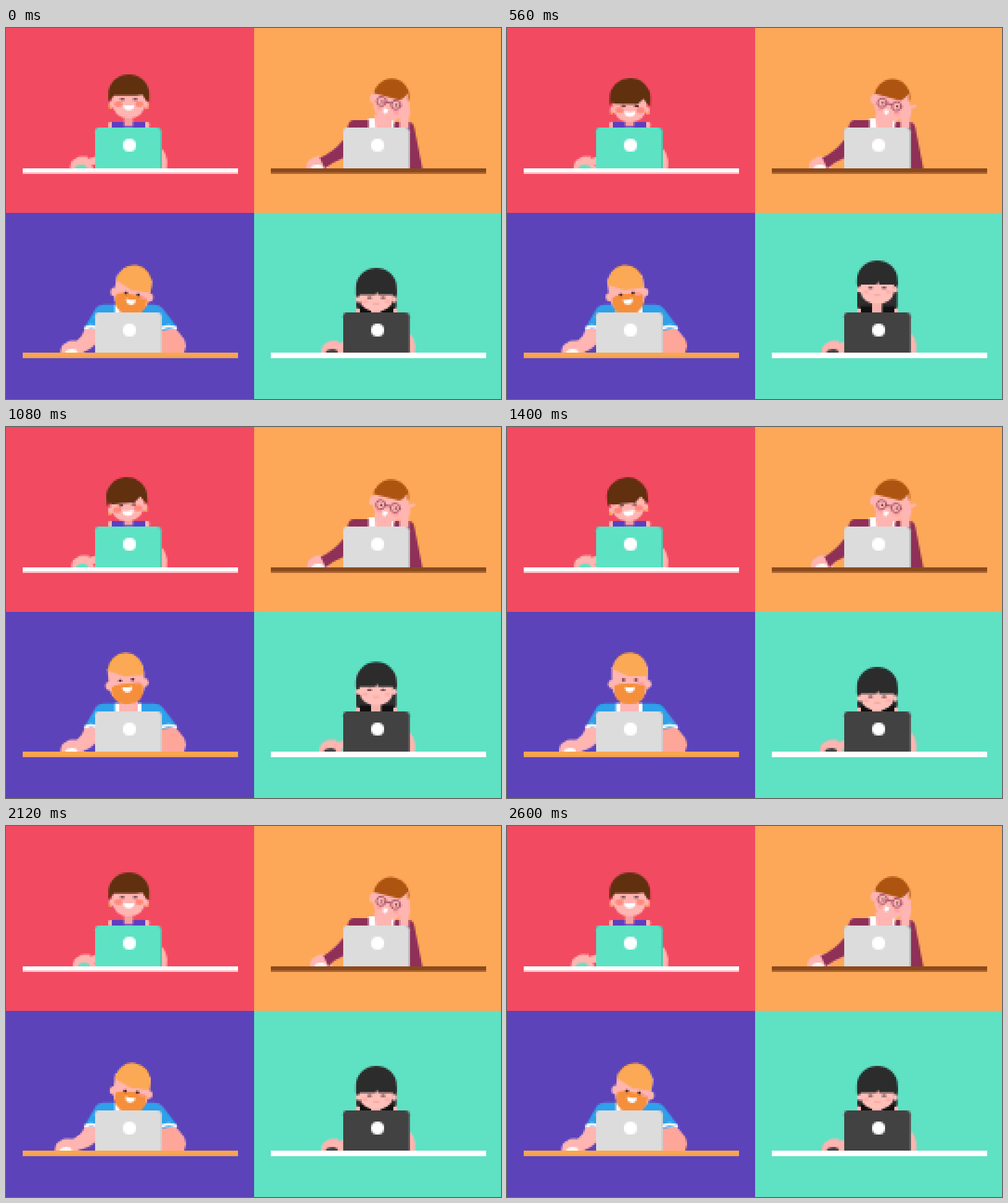
An HTML page with a canvas for the animation above (2640 ms loop, 800x600 px).

```html
<!DOCTYPE html>
<html>
<head>
<meta charset="utf-8">
<style>
html, body { margin: 0; width: 100%; height: 100%; overflow: hidden; }
canvas { display: block; width: 800px; height: 600px; image-rendering: pixelated; }
</style>
</head>
<body>
<canvas id="stage" width="267" height="201"></canvas>
<script>
// Three drawing units make one coarse pixel
const c = document.getElementById('stage').getContext('2d');
const LOOP = 2640, STEP = 40;
const SKIN = '#ffb5b1', DARK = '#4a2430';

function ease(u) {
  u = Math.min(1, Math.max(0, u));
  return u * u * (3 - 2 * u);
}
// Rises from 0 to 1 after `from` and sinks back after `to`
const hold = (t, from, to, ramp = 240) => ease((t - from) / ramp) - ease((t - to) / ramp);

function shape(d, color) {
  c.fillStyle = color;
  c.fill(new Path2D(d));
}
function rect(x, y, w, h, color, r = 0) {
  c.fillStyle = color;
  c.beginPath();
  c.roundRect(x, y, w, h, r);
  c.fill();
}
function oval(x, y, rx, ry, color) {
  c.fillStyle = color;
  c.beginPath();
  c.ellipse(x, y, rx, ry, 0, 0, 7);
  c.fill();
}
function limb(d, width, color, cap = 'round') {
  c.strokeStyle = color;
  c.lineWidth = width;
  c.lineCap = cap;
  c.stroke(new Path2D(d));
}
function pair(gap, y, rx, ry, color) {
  oval(-gap, y, rx, ry, color);
  oval(gap, y, rx, ry, color);
}
function smile(x, y, w) {
  shape(`M${x - w} ${y - 4}Q${x} ${y - 2} ${x + w} ${y - 4}Q${x + w} ${y + 5} ${x} ${y + 5}Q${x - w} ${y + 5} ${x - w} ${y - 4}`, '#fff');
}

// Head space: x = 0 at the chin, y = 0 at the crown; tilts about the chin
function head(x, crown, height, tilt, draw) {
  c.save();
  c.translate(x, crown + height);
  c.rotate(tilt * Math.PI / 180);
  c.translate(0, -height);
  draw();
  c.restore();
}

function hand(x, mouse, lift = 0) {
  shape(`M${x} 228Q${x} 215 ${x + 9} 212Q${x + 13} 208 ${x + 25} 209L${x + 38} 228Z`, SKIN);
  limb(`M${x + 23} 216L${x + 26} ${211 - lift * 4}`, 5, SKIN);
  shape(`M${x + 7} 228Q${x + 9} 222 ${x + 19} 222Q${x + 27} 222 ${x + 28} 228Z`, mouse);
}
const rightArm = () => shape('M250 194Q256 198 258 206Q262 214 260 228H250Z', SKIN);

function girl(t) {
  const nod = hold(t, 60, 1830);
  const tilt = 2.5 * (hold(t, 80, 400) + hold(t, 1500, 1880)) - 6 * hold(t, 900, 1480);
  const hx = 106 - 2.5 * Math.cos(6 * Math.PI * t / LOOP);
  rect(165, 153, 67, 10, SKIN, 4);
  rect(171, 153, 54, 10, '#5c3fc0');
  rect(191, 138, 14, 22, '#f5a09f');
  rightArm();
  limb(`M${hx + 28} 219L148 214`, 12, SKIN);
  hand(hx, '#5ee2c4');
  head(198.5, 75 + 6 * nod, 72, tilt, () => {
    pair(28, 50 + 3 * nod, 4, 6, SKIN);
    pair(30, 54 + 3 * nod, 2, 3, '#f9a64f');
    shape('M-27 26H27V46Q25 72 0 72Q-25 72 -27 46Z', SKIN);
    pair(17, 49 + 4 * nod, 7, 5, '#ff8a7c');
    pair(10.5, 41 + 5 * nod, 4, 1.6, DARK);
    smile(0, 54 + 5 * nod, 9);
    const f = 35 + 8 * nod;
    shape(`M-33 45V32A33 32 0 0 1 33 32V46L27 42L22 34L12 ${f}H-24L-29 41Z`, '#60300f');
  });
}

function clerk(t) {
  const nod = hold(t, 400, 1900, 400), open = hold(t, 100, 1850, 200);
  const hx = 84 + 3 * hold(t, 100, 500) + 6 * hold(t, 1000, 2300);
  const coat = '#8f3058';
  hand(hx, '#fff');
  shape(`M145 181V211Q130 217 ${hx + 30} 228L${hx + 22} 211Q128 203 145 181Z`, coat);
  shape('M144 184L153 155Q155 150 160 150H186V170H144Z', coat);
  shape('M222 160L228 153H250Q257 153 259 163L272 228H240Z', coat);
  rect(185, 147, 41, 18, '#fff');
  shape('M194 140H222V162H196Z', SKIN);
  head(212, 75 + 3 * nod, 74, 14 - nod, () => {
    oval(-27, 45 + 2 * nod, 6, 8, SKIN);
    shape('M-26 25H27V48Q25 75 2 75Q-23 74 -26 47Z', SKIN);
    pair(14, 59 + 2 * nod, 5, 3, '#ffa29e');
    c.strokeStyle = '#96405a';
    c.lineWidth = 2;
    const eye = 47 + 4 * nod;
    for (const x of [-13, 11]) {
      c.beginPath();
      c.arc(x, eye, 7.5, 0, 7);
      c.stroke();
      oval(x + 1, eye, 2, 1.6, DARK);
    }
    limb(`M-5 ${eye - 1}H3M19 ${eye - 1}H24`, 2, '#96405a');
    smile(-3, 60 + 3 * nod, 4);
    shape('M-28 37V29A29 29 0 0 1 29 29V39L25 24Q22 33 15 38Z', '#ad5510');
  });
  shape('M235 163V148L239 124Q247 112 250 122L253 137L250 148V163Z', SKIN);
  limb(`M247 132L${249 + open * 9} ${122 + open * 5}`, 5, SKIN);
}

function beard(t) {
  const up = hold(t, 700, 1420, 380), look = 5.5 * (1 - up);
  const tilt = 9 - 9 * hold(t, 0, 1800, 480) - 8 * hold(t, 0, 900, 480);
  const hx = 88 - 4 * hold(t, 1100, 1450) - 9 * hold(t, 1880, 2350);
  shape(`M128 186L146 190V212Q139 222 ${hx + 34} 228L${hx + 22} 213Q123 204 128 186Z`, SKIN);
  shape('M251 188H274Q291 205 291 217L288 228H251Z', '#ffa69b');
  shape('M127 187L146 154Q149 149 158 149H238Q249 149 253 155L277 187L252 191V170H146V187Z', '#2fa0ea');
  limb('M129 187Q137 183 146 187M253 187Q262 182 274 187', 5, '#fff');
  rect(176, 149, 43, 14, '#fff');
  rect(183, 143, 30, 20, SKIN);
  hand(hx, '#fff', hold(t, 120, 440, 160));
  head(198.5, 70 + 15 * (1 - up), 80, tilt, () => {
    pair(29, 48, 6, 7, SKIN);
    shape('M-29 20H29V52Q26 76 0 76Q-26 76 -29 52Z', SKIN);
    shape('M-25 51Q-18 46 0 47Q18 46 25 51V58Q25 80 0 80Q-25 80 -25 58Z', '#f58f3b');
    pair(10, 41 + look, 3, 2.2, DARK);
    oval(18, 47 + look * .6, 6, 2, '#ff9b98');
    smile(0, 56 + look * .6, 8);
    shape(`M-29 ${23 + look}A29 29 0 0 1 29 29V${35 + look}H-2Z`, '#fba954');
  });
}

function fringe(t) {
  const down = 1 - hold(t, 0, 900, 480);
  const hx = 108 - 3 * hold(t, 500, 1900) - 3 * hold(t, 1450, 1900);
  const top = 78 + 12 * down, skin = '#ffc0ba';
  rect(165, 152, 66, 14, SKIN, 5);
  rect(165, top + 33, 65, 156 - top - 33, '#2e2e2e', 3);
  rect(171, 152, 54, 12, '#111');
  rect(189, 140, 16, 23, '#f6b3ad');
  rightArm();
  limb(`M${hx + 28} 219L148 216`, 12, SKIN);
  hand(hx, '#424242');
  head(197.5, top, 70, 0, () => {
    pair(29, 47 + 4 * down, 4, 5, skin);
    shape('M-27 30H27V51Q23 70 0 70Q-23 70 -27 51Z', skin);
    pair(18, 51 + 4 * down, 5, 3, '#ffaeaa');
    pair(11, 44 + 4 * down, 4, 1.5, DARK);
    limb(`M-5 ${56 + 2 * down}H5`, 2, '#f09a98', 'butt');
    const f = 39 + 4.5 * down;
    shape(`M-33 ${f}V32A33 32 0 0 1 33 32V${f}H3L1 ${f - 5}L-1 ${f}Z`, '#2c2c2c');
  });
}

const SCENES = [
  { x: 0, y: 0, who: girl, back: '#f24a61', desk: '#fff', edge: '#ffc4cb', lid: '#5ee2c4', side: '#4cc9ae' },
  { x: 402, y: 0, who: clerk, back: '#fda758', desk: '#8a4a1c', edge: '#aa6530', lid: '#dcdcdc', side: '#bdbdbd' },
  { x: 0, y: 300, who: beard, back: '#5c43ba', desk: '#f9a64f', edge: '#f0a055', lid: '#dcdcdc', side: '#d0d0d0' },
  { x: 402, y: 300, who: fringe, back: '#5fe1c3', desk: '#fff', edge: '#fff', lid: '#424242', side: '#5b5b5b' }
];

function draw() {
  const t = Math.floor(performance.now() % LOOP / STEP) * STEP;
  c.setTransform(1 / 3, 0, 0, 1 / 3, 0, 0);
  for (const s of SCENES) {
    c.save();
    c.translate(s.x, s.y);
    rect(0, 0, 402, 303, s.back);
    s.who(t);
    rect(27, 228, 348, 9, s.desk);
    rect(27, 234, 348, 3, s.edge);
    rect(144, 162, 108, 66, s.side, [7, 7, 0, 0]);
    rect(144, 162, 105, 66, s.lid, [7, 7, 0, 0]);
    oval(199.5, 190.5, 10.5, 10.5, '#fff');
    c.restore();
  }
  requestAnimationFrame(draw);
}
draw();
</script>
</body>
</html>
```
